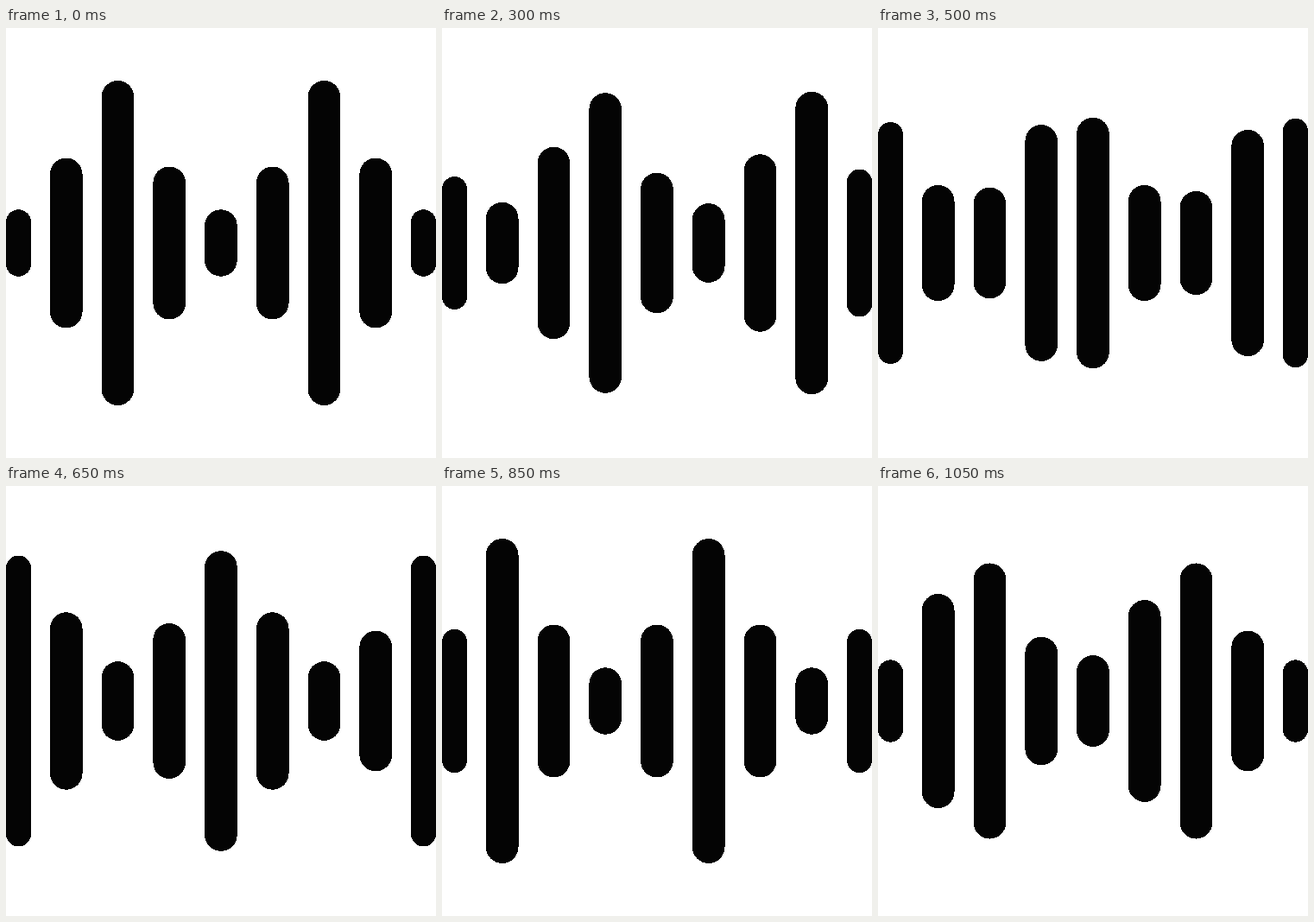
Write an HTML page that moves like this. It is 498 px wide and 498 px high and loops after 1.1 s.

```html
<!DOCTYPE html>
<html>
<head>
<meta charset="utf-8">
<title>Sound wave</title>
<style>
html, body { margin: 0; width: 100%; height: 100%; overflow: hidden; background: #fff; }
svg { display: block; fill: #040404; shape-rendering: crispEdges; }
</style>
</head>
<body>
<svg id="stage" width="498" height="498"></svg>
<script>
const MID = 249, GAP = 59.75, COUNT = 9;
const STEP_MS = 50, LOOP_MS = 1100, KEY_STEPS = 7, POSES = 4;
const LOW = 38.7, FLANK = 88.5, TALL_FLANK = 98.5, CREST = 188, EDGE_TRIM = 5.3;
const stage = document.getElementById('stage');

const bars = Array.from({ length: COUNT }, (_, i) => {
  const edge = i === 0 || i === COUNT - 1;
  const width = edge ? 29 : 37.62;
  const center = edge ? MID + Math.sign(i - 4) * 234.5 : MID - 0.05 + (i - 4) * GAP;
  const rect = document.createElementNS('http://www.w3.org/2000/svg', 'rect');
  rect.setAttribute('x', center - width / 2);
  rect.setAttribute('width', width);
  rect.setAttribute('rx', width / 2);
  stage.append(rect);
  return { rect, edge };
});

// Crests stand four bars apart and move one bar to the right per pose.
// Until the last pose, the outer flanks of the opening crests are taller.
function keyHeight(i, pose) {
  const k = pose % POSES, place = i - k;
  if (place % 2) return k < 3 && place % 6 === 1 ? TALL_FLANK : FLANK;
  return place % 4 ? CREST : LOW;
}

// Runs evenly through the first six steps, then a third faster.
function poseAt(ms) {
  const n = Math.floor(ms % LOOP_MS / STEP_MS);
  return (n <= 6 ? n : 6 + Math.round((n - 6) * 4 / 3)) / KEY_STEPS;
}

function draw(ms) {
  const pose = poseAt(ms), key = Math.floor(pose);
  bars.forEach(({ rect, edge }, i) => {
    const from = keyHeight(i, key), to = keyHeight(i, key + 1);
    const trim = edge ? EDGE_TRIM * Math.min(pose, 1) : 0;
    const half = from + (to - from) * (pose - key) - trim;
    rect.setAttribute('y', MID - half);
    rect.setAttribute('height', half * 2);
  });
}

const start = performance.now();
function tick() {
  draw(performance.now() - start);
  requestAnimationFrame(tick);
}
tick();
</script>
</body>
</html>
```
